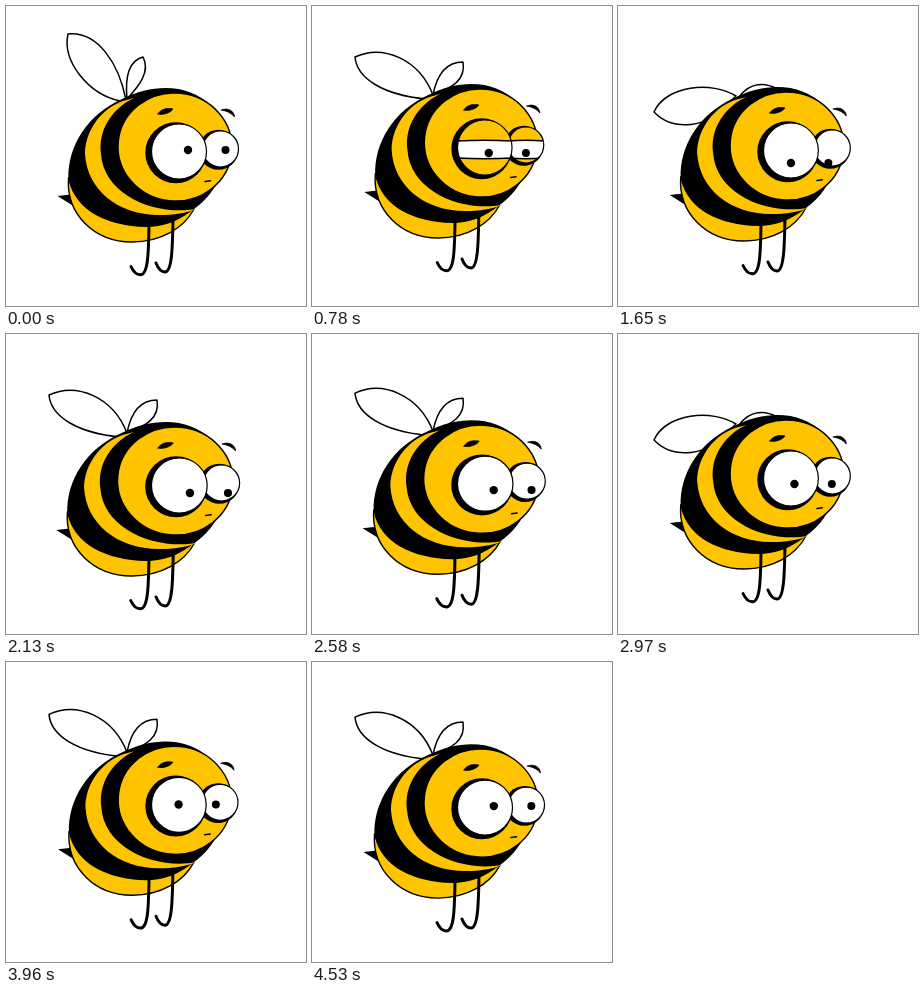
These frames come from a looping animation (300 px wide and 300 px high, 4560 ms). An HTML page with a canvas:

```html
<!DOCTYPE html>
<html lang="en">
<head>
<meta charset="utf-8">
<title>Bee</title>
<style>
html, body { margin: 0; width: 100%; height: 100%; overflow: hidden; background: #fff; }
canvas { display: block; width: 100vw; height: 100vh; }
</style>
</head>
<body>
<canvas id="stage" width="300" height="300"></canvas>
<script>
const ctx = document.getElementById('stage').getContext('2d');
const LOOP = 4560, STEP = 30, YELLOW = '#ffc400', BLACK = '#000', WHITE = '#fff';

// Keys are [time, value]
const BOB = [[0, 0], [500, -2], [780, -4], [1100, -5.5], [1400, -4.5], [1650, -1],
  [2130, 6], [2300, 6.2], [2700, 3], [2970, -1], [3390, -5], [3600, -5.5], [3800, -4], [4320, 0]];
const GAZE_X = [[0, 182], [780, 177], [1650, 173], [2130, 183.5], [2970, 176.5], [3390, 166.5], [4530, 181.8]];
const GAZE_Y = [[0, 144], [780, 151], [1650, 158], [2130, 153], [2970, 151], [3390, 147], [4530, 144]];
const BLINK = { middle: 810, half: 100, y: 147.5, reach: 28 };

const path = d => new Path2D(d);
const WINGS = {
  up: [
    path('M114 95C82 88 56 55 62 28C92 25 113 58 120 94Z'),
    path('M121 93C119 72 122 55 137 51C145 66 132 81 121 93Z')
  ],
  mid: [
    path('M114 97C72 93 45 77 43 55C71 42 107 57 121 93Z'),
    path('M121 93C125 72 135 60 151 60C154 78 140 86 121 93Z')
  ],
  low: [
    path('M118 91C94 76 48 80 36 107C52 124 83 125 104 104Z'),
    path('M121 92C132 77 147 77 159 84L140 95Z')
  ]
};
const FLAP = ['up', 'mid', 'low', 'mid'];

const STINGER = path('M51.5 190L65 188.5L69 201Z');
const TAIL = path('M62.5 172C60 208 88 236 126 236C155 236 178 222 188 203L130 140Z');
const BODY = path('M62.5 174C61 140 82 108 116 93C148 77 184 78 205 100L215 130L215 170C207 186 199 195 188 203C172 216 156 221 140 221C101 220 70 205 62.5 174Z');
const BAND = path('M117 95C94 103 79 126 79 148C81 184 112 209 153 209C168 209 180 207 190 203C150 210 98 190 95 148C92 125 105 103 128 92Z');
const LEGS = [
  path('M143 220C142.5 248 142 268.8 134.5 268.8C130 268.8 127 265 125 260.5'),
  path('M167 213C166.5 242 166 266 159 266C155 266 152 262 150 257')
];
const BROWS = [
  path('M152 108C154 103.5 161 101.5 167 103C165 106.5 157 109.5 152 108Z'),
  path('M215.5 104C221 101.5 228 104 228.5 111C225.5 107 221 105 215.5 104Z')
];
const MOUTH = path('M199 175.5L204.5 174.7');

// Cyclic cubic interpolation through keys
function sample(keys, t) {
  const n = keys.length;
  const key = i => {
    const turn = Math.floor(i / n), [time, value] = keys[i - turn * n];
    return [time + turn * LOOP, value];
  };
  let i = n - 1;
  while (keys[i][0] > t) i--;
  const [p, a, b, q] = [key(i - 1), key(i), key(i + 1), key(i + 2)];
  const span = b[0] - a[0], u = (t - a[0]) / span;
  const slopeA = (b[1] - p[1]) / (b[0] - p[0]) * span;
  const slopeB = (q[1] - a[1]) / (q[0] - a[0]) * span;
  const u2 = u * u, u3 = u2 * u;
  return (2 * u3 - 3 * u2 + 1) * a[1] + (u3 - 2 * u2 + u) * slopeA
    + (3 * u2 - 2 * u3) * b[1] + (u3 - u2) * slopeB;
}

function paint(shape, fill, line, width) {
  if (fill) {
    ctx.fillStyle = fill;
    ctx.fill(shape);
  }
  if (line) {
    ctx.strokeStyle = line;
    ctx.lineWidth = width;
    ctx.stroke(shape);
  }
}

function oval(x, y, rx, ry = rx, turn = 0) {
  const shape = new Path2D();
  shape.ellipse(x, y, rx, ry, turn, 0, Math.PI * 2);
  return shape;
}

function lid(x, r, edge, side) {
  const far = edge + side * 3 * r, bow = edge + side * 1.5;
  paint(path(`M${x - r} ${edge}Q${x} ${bow} ${x + r} ${edge}V${far}H${x - r}Z`), YELLOW, BLACK, 1.5);
}

function eye(x, y, r, rim, pupilX, pupilY, pupilR, open) {
  const ball = oval(x, y, r);
  paint(oval(x - rim * 0.8, y + rim * 0.3, r + rim * 0.75), BLACK);
  paint(ball, WHITE);
  ctx.save();
  ctx.clip(ball);
  paint(oval(pupilX, pupilY, pupilR), BLACK);
  if (open < 1) {
    for (const side of [-1, 1]) lid(x, r, BLINK.y + side * BLINK.reach * open, side);
  }
  ctx.restore();
  paint(ball, null, BLACK, 1.2);
}

function draw(t) {
  const step = Math.floor(t / STEP);
  const bob = sample(BOB, t);
  const gazeX = sample(GAZE_X, t), gazeY = sample(GAZE_Y, t);
  const open = Math.min(1, Math.abs(t - BLINK.middle) / BLINK.half);
  const beat = Math.floor(step * 56 / 38 + 0.96) % FLAP.length;

  ctx.setTransform(1, 0, 0, 1, 0, 0);
  ctx.fillStyle = WHITE;
  ctx.fillRect(0, 0, 300, 300);
  ctx.lineCap = ctx.lineJoin = 'round';

  ctx.translate(0, bob);
  for (const wing of WINGS[FLAP[beat]]) paint(wing, WHITE, BLACK, 1.5);

  const stretch = 1 + bob * 0.0022;
  ctx.setTransform(stretch, 0, 0, 1, 148 * (1 - stretch), bob);

  paint(STINGER, BLACK);
  paint(TAIL, YELLOW, BLACK, 1.4);
  paint(BODY, BLACK);
  paint(BAND, YELLOW);
  paint(oval(169, 141, 57, 54, 0.1), YELLOW, BLACK, 1.4);
  for (const leg of LEGS) paint(leg, null, BLACK, 3);

  eye(214.5, 143, 18, 2.6, gazeX + 37.5, gazeY, 4, open);
  eye(173, 145.5, 27.5, 4, gazeX, gazeY, 4.2, open);

  for (const brow of BROWS) paint(brow, BLACK, BLACK, 0.8);
  paint(MOUTH, null, BLACK, 1.5);
}

function tick() {
  const now = performance.now() % LOOP;
  draw(Math.floor(now / STEP) * STEP);
  requestAnimationFrame(tick);
}
tick();
</script>
</body>
</html>
```
